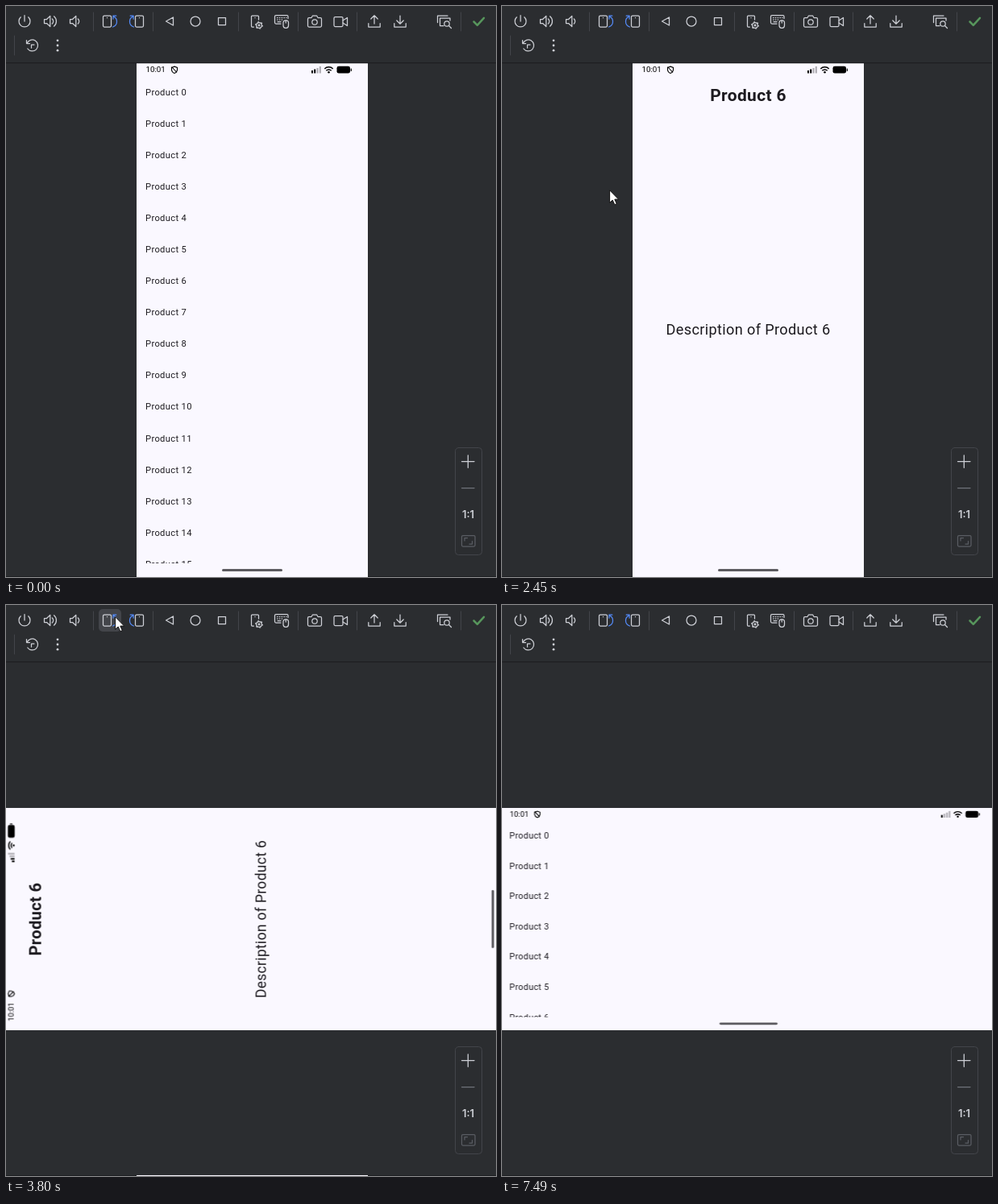
An HTML page that plays this animation: 608x709 px, repeating every 7860 ms.

```html
<!DOCTYPE html>
<html lang="en">
<head>
<meta charset="utf-8">
<title>Device rotation</title>
<style>
html, body { margin: 0; width: 100%; height: 100%; overflow: hidden; background: #2b2d30; }
#stage { position: relative; width: 608px; height: 709px; overflow: hidden; background: #2b2d30; }
#stage > * { position: absolute; left: 0; top: 0; }
.run, #port, #land, #cursor { animation: 7860ms step-end infinite; }

/* phone */
.screen { overflow: hidden; transform-origin: 0 0; background: #faf8ff; color: #1d1b20;
  font: 11.17px Roboto, sans-serif; letter-spacing: .35px; }
.content, .list, .detail { position: absolute; inset: 0; }
.list { top: 16.7px; bottom: 17px; overflow: hidden; }
.list div { height: 39.09px; line-height: 39.09px; padding-left: 11px; }
.detail div { position: absolute; width: 100%; text-align: center; line-height: 30px; white-space: nowrap; }
.detail .title { top: 25px; font-size: 20.94px; font-weight: 700; }
.detail .about { top: 316px; font-size: 18.15px; }
.clock { position: absolute; left: 11.5px; top: 2px; font-size: 9.77px; line-height: 12px; letter-spacing: 0; color: #000; }
.shield { position: absolute; left: 42px; top: 3px; }
.radio { position: absolute; right: 19px; top: 2px; }
.pill { position: absolute; left: 50%; bottom: 7px; width: 75px; height: 2.6px; margin-left: -37.5px;
  border-radius: 2px; background: #5c5b60; }
#port { width: 287px; height: 638px; animation-name: port; }
#land { width: 638px; height: 287px; transform: translate(-1.4px, 252px) scale(.9617); animation-name: land; }
#land .content { animation-name: turn; }
#land .bar2 { animation-name: signal; }
#port .list { animation-name: leave; }
#port .detail { animation-name: enter; }
#rest { left: 162px !important; top: 708px !important; width: 287px; height: 1px; background: #faf8ff; animation-name: rest; }
#base { top: 708px !important; width: 608px; height: 1px; background: #1e1f22; }
#hover { animation-name: hover; }
#cursor { animation-name: cursor; }

@keyframes port {
  0% { transform: translate(162px, 71px); opacity: 1; }
  48.34% { transform: translate(-1.4px, 528px) rotate(-90deg) scale(.9617); }
  54.19% { opacity: .5; }
  55.34%, 100% { opacity: 0; }
}
@keyframes land { 0% { opacity: 0; } 54.19%, 100% { opacity: 1; } }
@keyframes turn {
  0%, 54.19% { transform: rotate(-72deg); opacity: .3; }
  55.34% { transform: rotate(-32deg); opacity: .8; }
  56.48% { transform: rotate(-8deg); opacity: 1; }
  57.63%, 100% { transform: none; opacity: 1; }
}
@keyframes signal { 0% { fill: #000; } 85.87%, 100% { fill: #aaa8ae; } }
@keyframes leave {
  0% { opacity: 1; } 18.57% { opacity: .92; } 19.72% { opacity: .68; } 20.86% { opacity: .4; }
  22.01% { opacity: .2; } 23.15% { opacity: .08; } 24.3%, 100% { opacity: 0; }
}
@keyframes enter {
  0% { opacity: 0; } 18.57% { opacity: .08; } 19.72% { opacity: .32; } 20.86% { opacity: .6; }
  22.01% { opacity: .8; } 23.15% { opacity: .92; } 24.3%, 100% { opacity: 1; }
}
@keyframes rest { 0% { opacity: 0; } 48.34% { opacity: 1; } 95.29%, 100% { opacity: 0; } }
@keyframes hover {
  0% { opacity: 0; fill: #4b4d51; } 38.04% { opacity: 1; } 48.34% { fill: #43454a; } 77.86%, 100% { opacity: 0; }
}
@keyframes cursor {
  0% { opacity: 0; transform: translate(177px, 475px); }
  4.7% { opacity: 1; transform: translate(177px, 475px); }
  5.85% { transform: translate(213px, 430px); }
  6.99% { transform: translate(247px, 392px); }
  8.14% { transform: translate(272px, 367px); }
  9.28% { transform: translate(287px, 354px); }
  10.43% { transform: translate(293px, 349px); }
  12.72% { transform: translate(293px, 346px); }
  26.59% { transform: translate(284px, 339px); }
  27.73% { transform: translate(252px, 317px); }
  28.88% { transform: translate(208px, 287px); }
  30.02% { transform: translate(165px, 256px); }
  31.17% { transform: translate(133px, 228px); }
  32.31% { transform: translate(109px, 175px); }
  33.46% { transform: translate(98px, 123px); }
  34.6% { transform: translate(100px, 80px); }
  35.75% { transform: translate(104px, 55px); }
  36.89% { transform: translate(121px, 35px); }
  38.04% { transform: translate(136px, 17px); }
  39.18% { transform: translate(135px, 14px); }
  77.86% { transform: translate(109px, 181px); }
  79% { transform: translate(50px, 310px); }
  80.15% { transform: translate(29px, 420px); }
  81.29% { transform: translate(130px, 540px); }
  82.44% { transform: translate(320px, 641px); }
  83.58%, 100% { opacity: 0; transform: translate(320px, 641px); }
}
</style>
</head>
<body>
<div id="stage">
  <div id="base"></div>
  <div id="rest" class="run"></div>
  <div id="land" class="screen"></div>
  <div id="port" class="screen"></div>

  <svg width="608" height="709" fill="none" stroke="#ced0d6" stroke-width="1.25" stroke-linejoin="round" stroke-linecap="round">
    <path d="M0 70.5H608" stroke="#1e1f22"/>
    <path d="M108.5 8V31M182.500 8V31M288.500 8V31M362.500 8V31M435.500 8V31M564.500 8V31M10.500 37V61" stroke="#43454a" stroke-width="1"/>
    <rect id="hover" class="run" x="115" y="5" width="28" height="28" rx="5" stroke="none"/>
    <!-- power and volume -->
    <path d="M18.300 13.800A7 7 0 1 0 27.700 13.800M23 11.500V19"/>
    <g id="speaker"><path d="M47.500 16.500h3l4.300-4v13l-4.300-4h-3zM57.300 16a4 4 0 0 1 0 6"/></g>
    <path d="M59.500 12.800a8 8 0 0 1 0 12.400"/>
    <use href="#speaker" x="32"/>
    <!-- rotate -->
    <g id="rotate">
      <rect x="120.500" y="12" width="10" height="14" rx="1.500"/>
      <path d="M125.500 14.500v.2"/>
      <path d="M132.500 26c6.500-2 6.500-10.500 1-12.800M136.800 12.200h-3.900v4" stroke="#548af7"/>
    </g>
    <use href="#rotate" transform="translate(291) scale(-1 1)"/>
    <!-- navigation -->
    <path d="M198.500 19l9-5v10z"/>
    <circle cx="235" cy="19" r="6"/>
    <rect x="263.500" y="14.500" width="9" height="9"/>
    <!-- device settings, input -->
    <path d="M307.500 26h-2a1 1 0 0 1-1-1V13a1 1 0 0 1 1-1h7a1 1 0 0 1 1 1v4M309 14.500v.2"/>
    <circle cx="314" cy="24" r="3.300"/>
    <circle cx="314" cy="24" r="4.300" stroke-dasharray="1.600 2.900" stroke-linecap="butt"/>
    <circle cx="314" cy="24" r=".8"/>
    <path d="M341 22h-6a1.500 1.500 0 0 1-1.500-1.500v-7.500a1.500 1.500 0 0 1 1.500-1.500h13.500a1.500 1.500 0 0 1 1.500 1.500v2.500"/>
    <path d="M336.500 14.500H348M336.500 17H343" stroke-dasharray=".6 2.200"/>
    <path d="M337 19.500h4"/>
    <rect x="344" y="17.800" width="6.500" height="9.500" rx="3"/>
    <path d="M347.200 18v3"/>
    <!-- capture -->
    <path d="M376 14.500h3l1.500-2.500h5l1.500 2.500h3a1.500 1.500 0 0 1 1.500 1.500v8.500a1.500 1.500 0 0 1-1.500 1.500h-14a1.500 1.500 0 0 1-1.500-1.500v-8.500a1.500 1.500 0 0 1 1.500-1.500z"/>
    <circle cx="383" cy="20" r="3.200"/>
    <rect x="407" y="13.500" width="11" height="12" rx="1.500"/>
    <path d="M418 18l5.500-3.500v10l-5.500-3.500"/>
    <!-- transfer -->
    <path d="M457 22V12M452.800 16l4.200-4.200 4.200 4.200M449.800 21.500V26h14.400v-4.500"/>
    <path d="M489 12V22M484.800 18l4.200 4.200 4.200-4.200M481.800 21.500V26h14.400v-4.500"/>
    <!-- inspect -->
    <path d="M535.500 20.500v-8.500h12.500M543 24.500h-4.500v-9.500h12.500v3"/>
    <circle cx="547" cy="22" r="3.200"/>
    <path d="M549.500 24.500l3 3"/>
    <path d="M580.500 19.500l4.300 4.300 8.200-9" stroke="#57965c" stroke-width="2.500"/>
    <!-- second row -->
    <path d="M25.500 42.500v4h4M26 46.500a7 7 0 1 1 .8 6.500M31.500 52v-4h3.500"/>
    <g fill="#ced0d6" stroke="none"><circle cx="64" cy="42.800" r="1.400"/><circle cx="64" cy="49" r="1.400"/><circle cx="64" cy="55.200" r="1.400"/></g>
    <!-- zoom -->
    <rect x="557.500" y="548.500" width="33" height="133" rx="4" fill="#2b2d30" stroke="#43454a" stroke-width="1"/>
    <path d="M565.500 565.500h15.500M573.300 557.800v15.500"/>
    <path d="M565.500 598.500h15.500" stroke="#6f737a"/>
    <text x="573.500" y="635.500" text-anchor="middle" font-family="Inter, sans-serif" font-size="13" font-weight="600" fill="#ced0d6" stroke="none">1:1</text>
    <g stroke="#5a5d63"><rect x="565.500" y="657.500" width="16.500" height="13.500" rx="1.500"/><path d="M569 664v-3.500h3.500M578.500 664.500v3.500h-3.500"/></g>
  </svg>

  <svg id="cursor" width="14" height="21" overflow="visible">
    <path d="M.6 .8V16.200L4.200 13L6.800 18.700L9.300 17.600L6.800 12.100H11.600Z" fill="#fff" stroke="#111" stroke-width="1"/>
  </svg>
</div>
<script>
const rows = n => Array.from({ length: n }, (_, i) => `<div>Product ${i}</div>`).join('');

const status = `
  <div class="clock">10:01</div>
  <svg class="shield" width="10" height="11" fill="none" stroke="#000" stroke-width="1.1">
    <path d="M1.500 2.500L5 1.200L8.500 2.500V5.500Q8 8.500 5 9.500Q2 8.500 1.500 5.500ZM1.500 1.500L8 8.500"/>
  </svg>
  <svg class="radio" width="52" height="12">
    <rect x="1" y="7" width="2" height="3.500"/>
    <rect class="bar2 run" x="4.200" y="5.500" width="2" height="5"/>
    <g fill="#aaa8ae"><rect x="7.500" y="4" width="2" height="6.500"/><rect x="10.800" y="2" width="2" height="8.500"/></g>
    <g fill="none" stroke="#000" stroke-width="1.500">
      <path d="M17.300 5a7.300 7.300 0 0 1 10.400 0M19.300 7.300a4.500 4.500 0 0 1 6.400 0"/>
    </g>
    <circle cx="22.500" cy="9.300" r="1.300"/>
    <rect x="32.500" y="1.800" width="16.500" height="8.800" rx="2.400"/>
    <rect x="49.700" y="4.500" width="1.200" height="3.400" rx=".5"/>
  </svg>
  <div class="pill"></div>`;

const fill = (id, body) => {
  document.getElementById(id).innerHTML = `<div class="content run">${body}${status}</div>`;
};

fill('port', `<div class="list run">${rows(16)}</div>
  <div class="detail run"><div class="title">Product 6</div><div class="about">Description of Product 6</div></div>`);
fill('land', `<div class="list">${rows(7)}</div>`);
</script>
</body>
</html>
```
